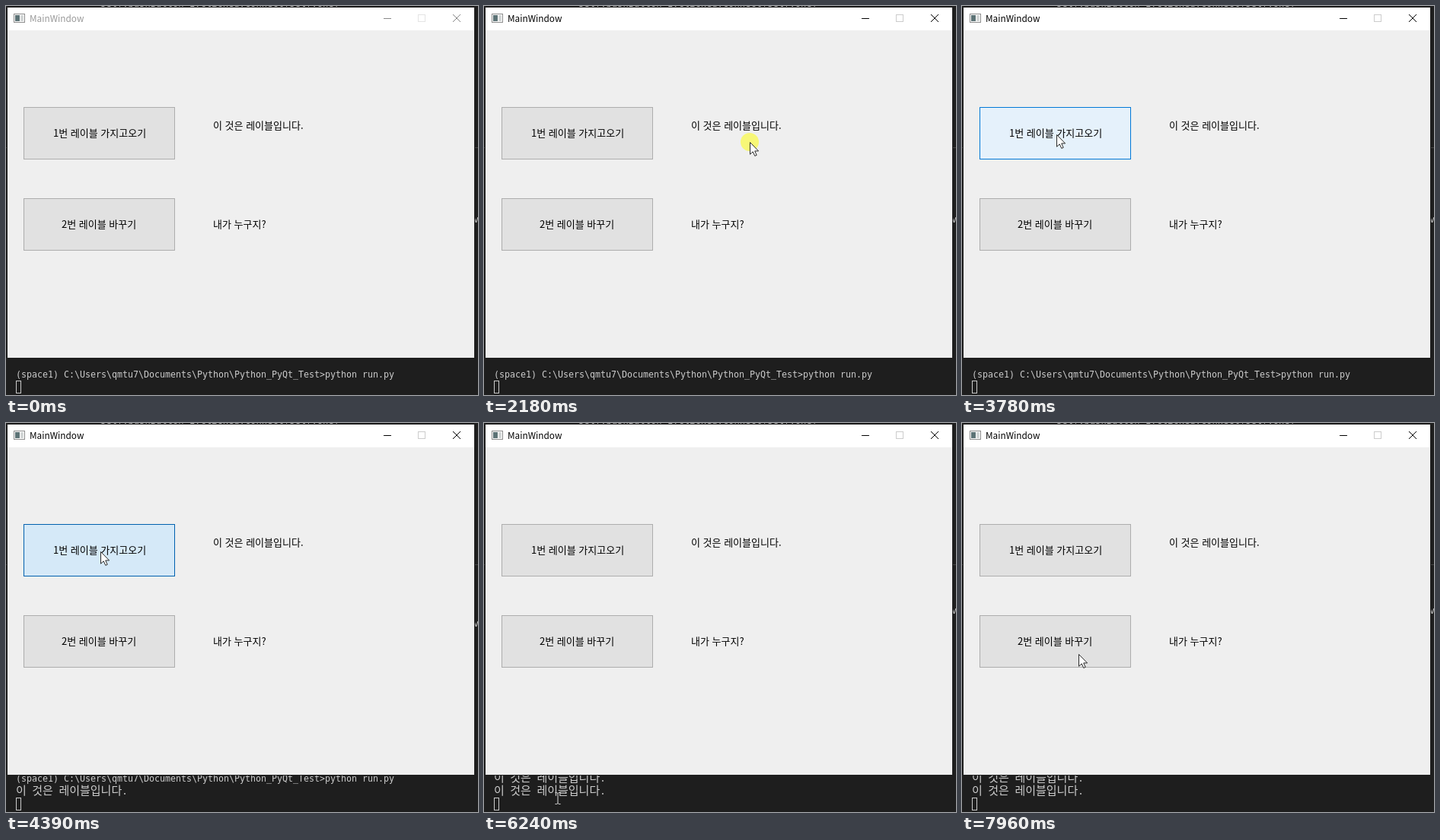
Recreate the animation shown at these times as an HTML page. Size 620 px wide and 512 px high, loop 8000 ms.

```html
<!DOCTYPE html>
<html lang="ko">
<head>
<meta charset="utf-8">
<style>
  html, body { margin: 0; width: 100%; height: 100%; overflow: hidden; background: #1e1e1e; }
  svg { display: block; }
  text { white-space: pre; }
  .ui { font: 13px "Noto Sans CJK KR", "Noto Sans CJK", sans-serif; }
  .title { font-size: 11.8px; font-weight: 300; }
  .code { font: 11.63px "DejaVu Sans Mono", monospace; fill: #ccc; }
  .out { font: 15px "Noto Sans Mono CJK KR", "Noto Sans CJK KR", monospace; fill: #ccc; }
</style>
</head>
<body>
<svg width="620" height="512" viewBox="0 0 620 512">
  <rect width="620" height="512" fill="#1e1e1e"/>
  <text class="code" x="124" y="1" style="font-size:12.13px">self.pushButton_1.clicked.connect(self.one)</text>
  <path d="M0 186.5H620" stroke="#444"/>
  <g id="scroll">
    <text class="code" x="13" y="489">(space1) C:\Users\qmtu7\Documents\Python\Python_PyQt_Test>python run.py</text>
    <text class="out" x="13" y="506">이 것은 레이블입니다.</text>
    <text class="out" x="13" y="523">이 것은 레이블입니다.</text>
    <text class="code" x="614" y="285">v</text>
  </g>
  <rect x="13.5" y="493.5" width="6" height="16" fill="none" stroke="#ccc"/>

  <rect x="1.5" y="1.5" width="614" height="462" fill="#efefef" stroke="#1e1e1e"/>
  <rect x="2" y="2" width="613" height="30" fill="#fff"/>
  <rect x="10.5" y="10.5" width="14" height="11" fill="#fff" stroke="#8c8c8c"/>
  <rect x="12" y="12" width="6" height="8" fill="#5d7376"/>
  <rect x="19" y="12" width="4" height="8" fill="#d2d6d6"/>
  <text id="title" class="ui title" x="31" y="21">MainWindow</text>
  <path id="controls" d="M496 16.5h10M587 11l10 10M597 11l-10 10" fill="none"/>
  <rect id="max" x="541.5" y="11.5" width="9" height="9" fill="none"/>

  <rect class="button" x="23.5" y="133.5" width="198" height="68"/>
  <rect class="button" x="23.5" y="253.5" width="198" height="68"/>
  <g class="ui">
    <text x="62" y="172">1번 레이블 가지고오기</text>
    <text x="73" y="292">2번 레이블 바꾸기</text>
    <text x="272" y="162">이 것은 레이블입니다.</text>
    <text x="272" y="292">내가 누구지?</text>
  </g>

  <g id="pointer">
    <circle id="halo" r="12" fill="#ff0" opacity=".5"/>
    <path id="arrow" d="M.5 .5V16.2L4.2 12.8L6.8 18.4L9.2 17.3L6.7 11.9H11.6Z" fill="#fff" stroke="#2a2a2a"/>
    <path id="beam" d="M-3.5 -7.5H-1.5L0 -6.5L1.5 -7.5H3.5M0 -6.5V6.5M-3.5 7.5H-1.5L0 6.5L1.5 7.5H3.5" fill="none" stroke="#ddd"/>
  </g>
</svg>
<script>
const LOOP = 8000, ENTER = 260, LINE = 17;
const $ = id => document.getElementById(id);
const buttons = document.querySelectorAll('.button');
const outputs = document.querySelectorAll('.out');

// Pointer moves: [start, end, x, y]
const moves = [
  [260, 560, 180, 190], [560, 800, 205, 218],
  [1370, 1850, 318, 141], [1850, 2110, 349, 179],
  [2250, 2420, 150, 170], [2940, 3200, 317, 151], [3350, 3710, 124, 169],
  [5150, 5840, 85, 501], [5930, 6040, 93, 494], [6180, 6240, 97, 494],
  [6240, 6500, 74, 503], [6500, 7010, 134, 365],
  [7070, 7380, 180, 290], [7380, 7690, 276, 285], [7820, 7960, 153, 304]
];
// Mouse button: [down, up]
const clicks = [[960, 1100], [2180, 2250], [4320, 4390], [4810, 4880]];

const clamp = v => Math.min(1, Math.max(0, v));
const ease = k => k * k * (3 - 2 * k);
const mix = (a, b, k) => a.map((v, i) => v + (b[i] - v) * k);
const rgb = c => `rgb(${c.map(Math.round)})`;
const show = (el, on) => el.setAttribute('visibility', on ? 'visible' : 'hidden');

const pointer = t => moves.reduce(
  (pos, [from, to, x, y]) => mix(pos, [x, y], ease(clamp((t - from) / (to - from)))),
  [612, 465]);

function inside(t, i) {
  const [x, y] = pointer(t), top = 133 + 120 * i;
  return x >= 23 && x < 222 && y >= top && y < top + 69;
}

// Share of a short, slightly delayed time span spent over the button
function hover(t, i) {
  let hits = 0;
  for (let lag = 80; lag < 240; lag += 10) hits += inside(t - lag, i);
  return hits / 16;
}

const press = (t, i) => Math.max(...clicks.map(([down]) =>
  t >= down && inside(down, i) ? clamp(1 - (t - down) / 200) : 0));

function draw(t) {
  const active = t >= clicks[0][0];
  $('title').setAttribute('fill', active ? '#000' : '#999');
  $('controls').setAttribute('stroke', active ? '#000' : '#888');
  $('max').setAttribute('stroke', active ? '#ccc' : '#e4e4e4');

  buttons.forEach((b, i) => {
    const h = hover(t, i), p = press(t, i);
    const tone = (idle, over, down) => rgb(mix(mix(idle, over, h), down, p));
    b.setAttribute('fill', tone([225, 225, 225], [229, 241, 251], [204, 228, 247]));
    b.setAttribute('stroke', tone([173, 173, 173], [0, 120, 215], [0, 84, 153]));
  });

  const lines = clicks.filter(([down, up]) => t >= up && inside(down, 0)).length;
  $('scroll').setAttribute('transform', `translate(0 ${-LINE * lines})`);
  outputs.forEach((o, i) => show(o, i < lines));

  const [x, y] = pointer(t).map(Math.round);
  const overTerminal = y > 465;
  $('pointer').setAttribute('transform', `translate(${x} ${y})`);
  show($('arrow'), t >= ENTER && !overTerminal);
  show($('beam'), t >= ENTER && overTerminal);
  show($('halo'), clicks.some(([down, up]) => t >= down && t < up));
}

let start;
function tick(now) {
  start ??= now;
  draw((now - start) % LOOP);
  requestAnimationFrame(tick);
}
draw(0);
requestAnimationFrame(tick);
</script>
</body>
</html>
```
